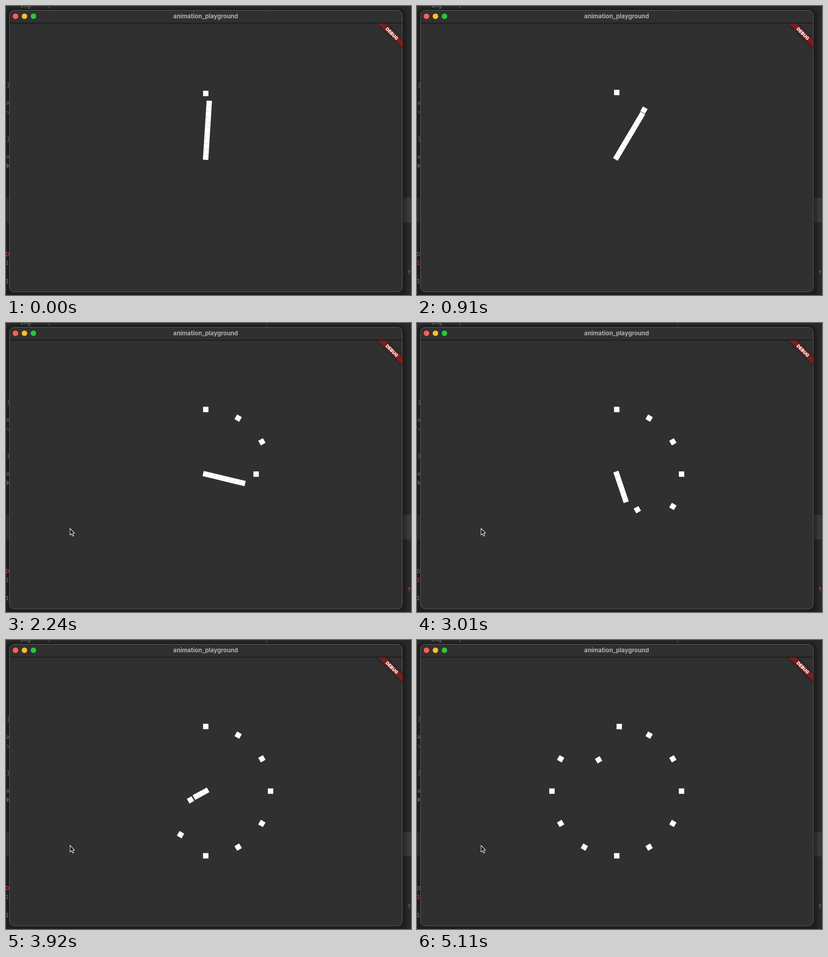
An HTML page that plays this animation: 885 by 633 pixels, repeating every 5180 ms.

```html
<!DOCTYPE html>
<html lang="en">
<head>
<meta charset="utf-8">
<title>animation_playground</title>
<style>
  html, body { margin: 0; width: 100%; height: 100%; overflow: hidden; background: #262626; }
  svg { display: block; width: 885px; height: 633px; }
  .ui { font-family: Inter, "Open Sans", sans-serif; text-anchor: middle; }
  .code { font: 13px "Noto Sans Mono", "DejaVu Sans Mono", monospace; }
</style>
</head>
<body>
<svg viewBox="0 0 885 633">
  <defs>
    <filter id="soft" x="-10%" y="-10%" width="120%" height="120%"><feGaussianBlur stdDeviation="2"/></filter>
    <filter id="glow" x="-20%" y="-100%" width="140%" height="300%"><feGaussianBlur stdDeviation="3"/></filter>
    <clipPath id="content"><rect x="8" y="38" width="859" height="587"/></clipPath>
  </defs>

  <rect width="885" height="633" fill="#292929"/>
  <rect y="420" width="885" height="54" fill="#383a3d"/>
  <path d="M0 447H885" stroke="#303235"/>
  <path d="M569.5 0V9" stroke="#555"/>
  <rect x="-2" y="4" width="877" height="640" rx="18" opacity=".25" filter="url(#soft)"/>
  <g class="code" id="code"></g>

  <rect x="6.5" y="8.5" width="861" height="618.5" rx="11" fill="#0c0c0c"/>
  <rect x="7.5" y="9.5" width="858.5" height="616.5" rx="10" fill="#303030" stroke="#686868"/>
  <path d="M8 37.5H866" stroke="#080808"/>
  <circle cx="20.7" cy="22.5" r="6" fill="#ff5f57"/>
  <circle cx="40.3" cy="22.5" r="6" fill="#febc2e"/>
  <circle cx="60" cy="22.5" r="6" fill="#28c840"/>
  <text class="ui" x="436.2" y="27" font-size="13" font-weight="700" fill="#b0b0b0">animation_playground</text>

  <g clip-path="url(#content)">
    <g transform="translate(867 37) rotate(45)">
      <rect x="-40" y="27.5" width="80" height="11.8" opacity=".5" filter="url(#glow)"/>
      <rect x="-40" y="27.5" width="80" height="11.8" fill="#7c1d1d"/>
      <text class="ui" y="37" font-size="9.8" font-weight="900" fill="#fff">DEBUG</text>
    </g>
  </g>

  <g id="squares" transform="translate(436.5 331)" fill="#fff"></g>
  <path id="cursor" d="M140 450V464.3L143.3 461.4L145.6 466.7L147.9 465.7L145.6 460.5H149.8Z"
        fill="#000" stroke="#fff" stroke-width="1.1" stroke-linejoin="round"/>
</svg>
<script>
const NS = 'http://www.w3.org/2000/svg';
const LOOP = 5180, STEP = 70, COUNT = 12, SIZE = 11.8, FLIGHT = 520, CURSOR_AT = 1330;
const RADIUS = COUNT * SIZE;

// Arm angle in degrees over time, accelerating
const ARM = [[-426, 0], [0, 3.6], [560, 17.3], [910, 30.6], [1470, 56.8], [2240, 103.5],
             [3010, 161.4], [3920, 241.3], [4480, 297], [5110, 362.2], [5180, 369.5]];
// Release time of each square, outermost first
const RELEASE = [-426, 890, 1520, 2068, 2480, 2869, 3234, 3573, 3905, 4205, 4512, 4819];

const $ = id => document.getElementById(id);
function add(parent, tag, attrs, text = '') {
  const el = document.createElementNS(NS, tag);
  for (const k in attrs) el.setAttribute(k, attrs[k]);
  el.textContent = text;
  return parent.appendChild(el);
}

[[31, 3, 'ing', '#777'], [91, 3, ',', '#c46a2c'],
 [1, 177, ']', '#6d7a56'], [0, 216, 'a', '#7a7a4c'], [1, 236, 'v', '#8c4340'],
 [1, 295, ']', '#6d7a56'], [0, 334, 'a', '#7a7a4c'], [1, 354, 'W', '#8a8a8a'],
 [-1, 548, 'D', '#d24a40'], [-1, 567, '1', '#d24a40'], [-1, 607, '1', '#8a8a8a'],
 [862, 587, 's t', '#d24a40']
].forEach(([x, y, s, fill]) => add($('code'), 'text', { x, y, fill }, s));

const squares = RELEASE.map(() =>
  add($('squares'), 'rect', { x: -SIZE / 2, y: -SIZE / 2, width: SIZE, height: SIZE }));

function slope(i) {
  const a = ARM[Math.max(i - 1, 0)], b = ARM[Math.min(i + 1, ARM.length - 1)];
  return (b[1] - a[1]) / (b[0] - a[0]);
}

// Smooth Hermite curve through the arm keys
function armAngle(t) {
  let i = 0;
  while (i < ARM.length - 2 && t >= ARM[i + 1][0]) i++;
  const [t0, a] = ARM[i], [t1, b] = ARM[i + 1];
  const h = t1 - t0, u = (t - t0) / h, v = 1 - u;
  return a * (1 + 2 * u) * v * v + b * u * u * (3 - 2 * u)
       + h * u * v * (slope(i) * v - slope(i + 1) * u);
}

function draw(t) {
  const arm = armAngle(t);
  squares.forEach((sq, k) => {
    const p = Math.min(Math.max((t - RELEASE[k]) / FLIGHT, 0), 1);
    const home = (COUNT - 1 - k) * SIZE;
    const dist = home + (RADIUS - home) * p;
    // On its second turn the arm sweeps landed squares along
    const held = p === 0 || arm >= 360 + 30 * k;
    const angle = held ? arm : 30 * k;
    sq.setAttribute('transform', `rotate(${angle}) translate(0 ${-dist})`);
  });
  $('cursor').style.display = t >= CURSOR_AT ? '' : 'none';
}

const start = performance.now();
function tick(now) {
  const t = Math.max(now - start, 0) % LOOP;
  draw(Math.floor(t / STEP) * STEP);
  requestAnimationFrame(tick);
}
draw(0);
requestAnimationFrame(tick);
</script>
</body>
</html>
```
